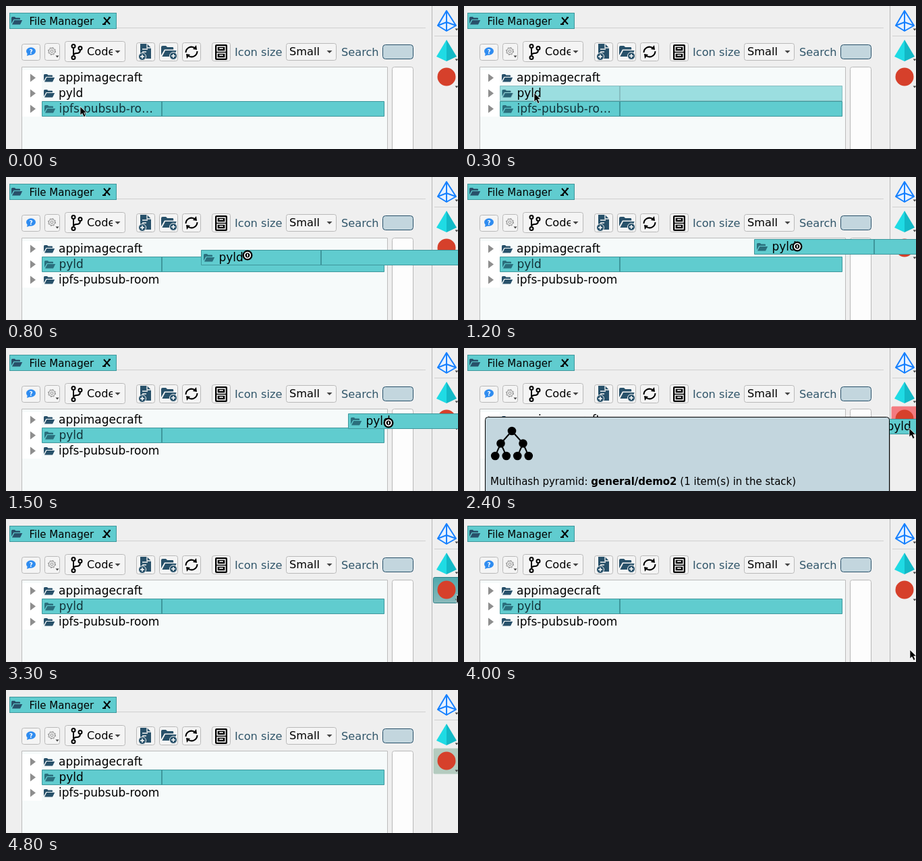
These frames come from a looping animation (670 by 212 pixels, 6500 ms). An HTML page:

```html
<!DOCTYPE html>
<html lang="en">
<head>
<meta charset="utf-8">
<title>Drag to pyramid</title>
<style>
  html, body { margin: 0; width: 100%; height: 100%; overflow: hidden; background: #efefef; }
  svg { display: block; font: 17px "DejaVu Sans", sans-serif; }
  .ui { font-size: 16.2px; }
  .small { font-size: 15px; }
  .label { fill: #31566a; }
  .navy { fill: #28516a; }
  .btn { fill: #f4f4f4; stroke: #b9b9b9; }
  .sel { fill: #60cccf; stroke: #3f979c; }
  .line { fill: none; stroke: #000; stroke-width: 2; }
</style>
</head>
<body>
<svg width="670" height="212" viewBox="0 0 670 212">
  <defs>
    <linearGradient id="hover" x2="0" y2="1">
      <stop stop-color="#50a9ae"/><stop offset="1" stop-color="#8ab9ba"/>
    </linearGradient>
    <g id="folder">
      <path d="M0 10V1.500Q0 0 1.500 0H5l1.500 1.500H12q1 0 1 1V4H3.500Z"/>
      <path d="M4.300 5H16.200L13 11.500H1Z"/>
    </g>
    <path id="more" d="M-2.500-1.500h5L0 1.500Z" fill="#444"/>
    <path id="drop" d="M-4-2h8L0 2Z" fill="#444"/>
    <rect id="btn" class="btn" x=".5" y="54.500" width="27" height="27" rx="3"/>
    <g id="plus">
      <circle class="navy" r="5.500" stroke="#f4f4f4"/>
      <path d="M-3 0h6M0-3v6" stroke="#fff" stroke-width="1.500"/>
    </g>
    <g id="bar">
      <path class="sel" d="M.5.5h507v22H.5Z"/>
      <path d="M178 0v23" stroke="#3f979c" stroke-width="2"/>
      <use href="#folder" fill="#2b6f7d" x="4" y="6"/>
    </g>
  </defs>

  <!-- tab -->
  <path d="M164 32.500H622" stroke="#d0d0d0"/>
  <rect class="sel" x="5.500" y="10.500" width="158" height="23"/>
  <use href="#folder" class="navy" x="8" y="16"/>
  <text class="small" x="34.500" y="28">File Manager</text>
  <path d="M145 17l9 10M154 17l-9 10M143 27h5M152 17h3" stroke="#000" stroke-width="1.900"/>

  <!-- toolbar -->
  <rect class="btn" x="23.500" y="56.500" width="27" height="24" rx="3"/>
  <ellipse cx="37" cy="67" rx="7" ry="5.700" fill="#2f8cf0"/>
  <path d="M32 69l-1 5 6-2Z" fill="#2f8cf0"/>
  <text x="37" y="70.500" fill="#fff" font-size="9" font-weight="bold" text-anchor="middle">?</text>
  <rect class="btn" x="57.500" y="55.500" width="22" height="25" rx="3"/>
  <g fill="none" stroke="#8c8c8c">
    <circle cx="68" cy="67" r="5.500" stroke-dasharray="2.300 2"/>
    <circle cx="68" cy="67" r="4.500"/><circle cx="68" cy="67" r="2"/>
  </g>
  <use href="#more" x="76" y="75"/>
  <rect class="btn" x="87.500" y="52.500" width="89" height="30" rx="3"/>
  <g class="line">
    <circle cx="100" cy="59.500" r="2.500"/><circle cx="100" cy="76.500" r="2.500"/><circle cx="110" cy="62.500" r="2.500"/>
    <path d="M100 62v12M110 65q0 5-5 5q-5 0-5 4"/>
  </g>
  <svg x="120" y="54" width="38" height="28"><text class="ui" y="19">Code</text></svg>
  <use href="#drop" x="165.500" y="68"/>
  <use href="#btn" x="193"/><use href="#btn" x="227"/><use href="#btn" x="261"/><use href="#btn" x="305"/>
  <path class="navy" d="M199 56h10l6 6v16h-16Z"/>
  <path d="M209 56v6h6M202 64h8M202 68h6" fill="none" stroke="#f4f4f4" stroke-width="1.300"/>
  <use href="#plus" x="202" y="75"/>
  <use href="#folder" class="navy" transform="translate(230 59) scale(1.400)"/>
  <use href="#plus" x="248" y="74"/>
  <path d="M266.500 69a8.500 8.500 0 0 1 13-7M283.500 67a8.500 8.500 0 0 1-13 7" class="line"/>
  <path d="M277 64l5-6 1 7ZM273 72l-5 6-1-7Z"/>
  <rect x="310" y="57" width="18" height="23" rx="2"/>
  <path d="M313 60h12v7h-12ZM313 70h12v7h-12ZM317 64v-1h4v1M317 74v-1h4v1" fill="none" stroke="#fff" stroke-width="1.400"/>
  <text class="ui label" x="339" y="74">Icon size</text>
  <rect class="btn" x="415.500" y="55.500" width="74" height="25" rx="3"/>
  <text class="ui" x="420" y="73">Small</text>
  <use href="#drop" x="479.500" y="68"/>
  <text class="ui label" x="497" y="74">Search</text>
  <rect x="558.500" y="57.500" width="45" height="21" rx="4" fill="#c3d6de" stroke="#28516a"/>

  <!-- file tree -->
  <path d="M23.500 213V90.500H565.500V213" fill="#f6fafa" stroke="#bcbcbc"/>
  <path d="M24 95h29v69h-29Z" fill="#fff"/>
  <rect x="572.500" y="90.500" width="31" height="140" rx="3" fill="#fdfdfd" stroke="#b8b8b8"/>
  <g id="rows"></g>

  <!-- side bar -->
  <path d="M631.500 0V212" stroke="#b5b5b5"/>
  <path d="M635 44.500H670" stroke="#d0d0d0"/>
  <rect id="target" x="633.500" y="86.500" width="40" height="38" rx="2"/>
  <g stroke="#1580ff" stroke-width="2" stroke-linejoin="round">
    <path d="M653 7L640 29L653 37L667 29Z" fill="#e6f1ff"/>
    <path d="M653 7V37M640 29l13-5 14 5" fill="none"/>
  </g>
  <path d="M653 50L638 75L653 82Z" fill="#1fdbe4"/>
  <path d="M653 50L668 75L653 82Z" fill="#13b9c6"/>
  <circle cx="653" cy="105" r="13.500" fill="#d6402b"/>
  <use href="#more" x="668" y="35"/><use href="#more" x="668" y="80"/><use href="#more" x="668" y="120"/>

  <g id="drag"><use href="#bar"/><text x="26.500" y="17">pyld</text></g>

  <g id="tip">
    <rect x="31.500" y="102.500" width="599" height="130" rx="4" fill="#c3d6de" stroke="#000"/>
    <g id="tree"></g>
    <text class="small" x="39" y="203">Multihash pyramid: <tspan font-weight="bold">general/demo2</tspan> (1 item(s) in the stack)</text>
  </g>

  <path id="arrow" d="M0 0V13L3 10.300L5.500 15.500L8 14.300L5.600 9.300H9.500Z" stroke="#fff" stroke-width=".7"/>
  <g id="forbid">
    <circle r="7.500"/>
    <circle r="4.300" fill="none" stroke="#fff" stroke-width="1.700"/>
    <path d="M0-2V2" stroke="#fff" stroke-width="1.600"/>
  </g>
</svg>
<script>
const LOOP = 6500, STEP = 100;
const $ = id => document.getElementById(id);
const show = (el, on) => el.setAttribute("visibility", on ? "visible" : "hidden");
const move = (el, [x, y]) => el.setAttribute("transform", `translate(${x} ${y})`);
const add = (a, b) => [a[0] + b[0], a[1] + b[1]];
const clamp = k => Math.min(1, Math.max(0, k));

// Straight move from a to b between two times
const glide = (a, b, from, to, t) => {
  const k = clamp((t - from) / (to - from));
  return a.map((v, i) => Math.round(v + (b[i] - v) * k));
};

// Binary tree with three levels
const node = (level, i) =>
  [71 + (level && 33 / level * (i - (2 ** level - 1) / 2)), 123 + 18.5 * level];
for (let level = 0; level < 3; level++)
  for (let i = 0; i < 2 ** level; i++) {
    const [x, y] = node(level, i);
    const parent = node(Math.max(0, level - 1), i >> 1);
    $("tree").innerHTML += `<path class="line" d="M${x} ${y}L${parent}"/><circle cx="${x}" cy="${y}" r="6.3"/>`;
  }

const names = ["appimagecraft", "pyld", "ipfs-pubsub-room"];
$("rows").innerHTML = names.map((name, i) =>
  `<g transform="translate(53 ${95 + 23 * i})">
     <path d="M-17 5.500v12l8-6Z" fill="#8e8e8e"/>
     <use href="#folder" class="navy" x="3" y="6"/>
     <use href="#bar"/><text x="25" y="17">${name}</text>
   </g>`).join("");
const rows = [...$("rows").children].map(g => ({ bar: g.children[2], text: g.lastElementChild }));

// The dragged row is picked up, then eases right along a short upward arc
function dragAt(t) {
  if (t < 1000) return glide([79, 123], [289, 108], 700, 800, t);
  const u = clamp((t - 800) / 1600), left = 1 - u;
  const arc = 16 * Math.sin(Math.PI * Math.min(1, u / .6)) ** 2;
  return [289 + 311 * (1 - left ** 2.1), 105 + 3 * left ** 2 - arc].map(Math.round);
}

function pointerAt(t) {
  if (t < 700) return glide([110, 149], [104, 129], 0, 300, t);
  if (t < 3300) return add(dragAt(t), glide([69, 8], [60, 14], 800, 1500, t));
  if (t < 3800) return glide([668, 112], [661, 143], 3400, 3600, t);
  return glide([661, 143], [661, 194], 3800, 4000, t);
}

function targetColour(t) {
  if (t >= 4400) return "#b4cbbf";
  if (t >= 2000 && t < 3300) return "#f47b80";
  return t >= 3300 && t < 3600 ? "url(#hover)" : "none";
}

function setRow(i, selected, opacity, colour, label = names[i]) {
  const { bar, text } = rows[i];
  show(bar, selected);
  bar.setAttribute("opacity", opacity);
  text.setAttribute("x", selected ? 25.5 : 25);
  text.setAttribute("fill", colour);
  text.textContent = label;
}

function draw() {
  const t = Math.floor((performance.now() - start) % LOOP / STEP) * STEP;
  const early = t < 500;
  const dragging = t >= 700 && t < 3300;
  const blocked = dragging && t < 2000;

  setRow(0, false, 1, "#000");
  setRow(1, t >= 200, early ? .6 : 1, t >= 500 && t < 4800 ? "#12333a" : "#000");
  setRow(2, early, 1, early ? "#12333a" : "#000", early ? "ipfs-pubsub-ro…" : names[2]);

  show($("drag"), dragging);
  move($("drag"), dragAt(t));
  show($("tip"), t >= 2100 && t < 3300);
  $("target").setAttribute("fill", targetColour(t));
  $("target").setAttribute("stroke", t >= 3300 && t < 3600 ? "#2f7f86" : "none");

  show($("forbid"), blocked);
  show($("arrow"), !blocked && t < 4400);
  move($("forbid"), pointerAt(t));
  move($("arrow"), pointerAt(t));
  requestAnimationFrame(draw);
}
const start = performance.now();
draw();
</script>
</body>
</html>
```
